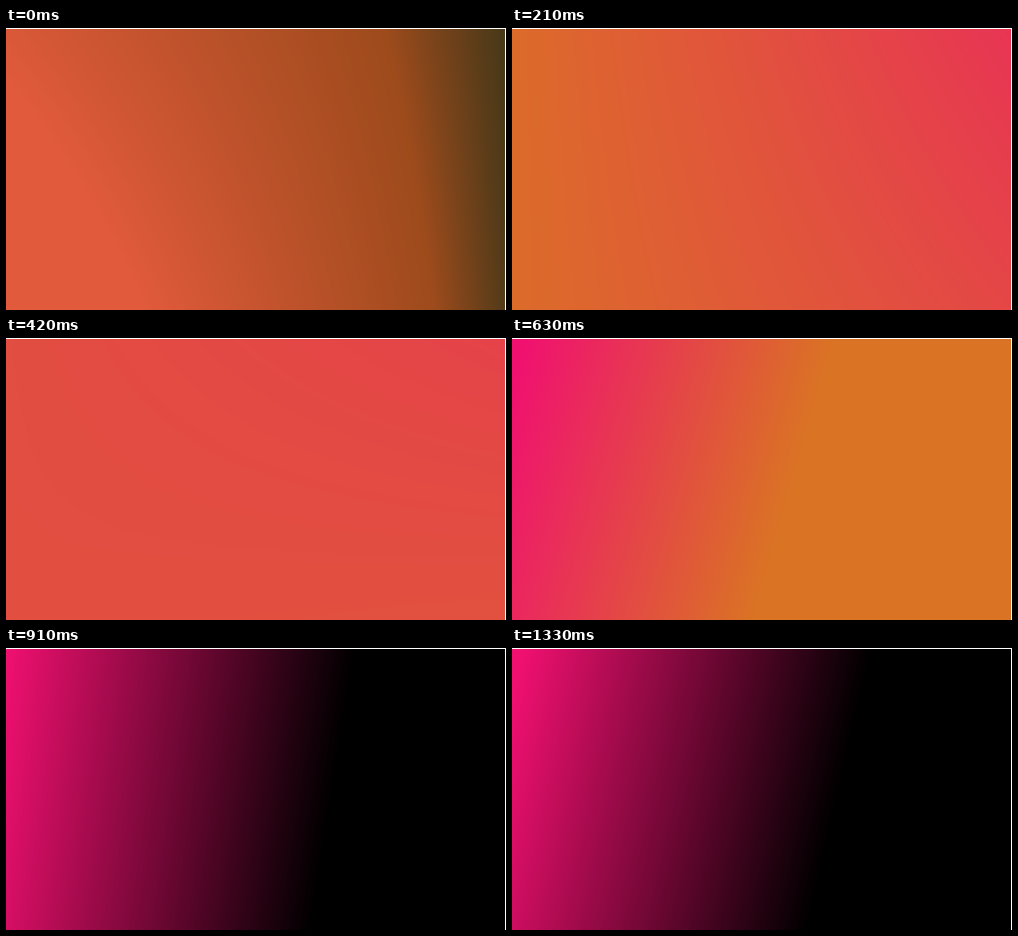
An HTML page with a canvas that plays this animation: 500 by 282 pixels, repeating every 1400 ms.

```html
<!DOCTYPE html>
<html>
<head>
<meta charset="utf-8">
<style>
  html, body { margin: 0; width: 100%; height: 100%; overflow: hidden; background: #fff; }
  canvas { position: absolute; left: 0; top: 1px; }
</style>
</head>
<body>
<canvas id="stage" width="499" height="281"></canvas>
<script>
const W = 499, H = 281, LOOP = 1400, STEP = 70, MID = 0.78;
const ctx = document.getElementById('stage').getContext('2d');
const image = ctx.createImageData(W, H);
image.data.fill(255);

const orange = [218, 115, 36], pink = [240, 16, 112], black = [0, 0, 0];
const lerp = (a, b, k) => a + (b - a) * k;
const mix = (a, b, k) => a.map((v, i) => lerp(v, b[i], k));

// A ramp of low, middle and high colours, placed by its value at each corner.
const key = (time, corners, low, high, middle = mix(low, high, MID)) =>
  ({ time, corners, low, middle, high });

// Corners: top left, top right, bottom left, bottom right.
const keys = [
  key(0, [0.1, 1, -0.35, 0.97], [226, 90, 60], [70, 56, 24], [158, 75, 28]),
  key(210, [0.08, 0.63, 0.08, 0.45], orange, pink),
  key(350, [0.16, 0.84, 0.24, 0.74], orange, pink),
  key(630, [1.03, -0.57, 0.77, -0.83], orange, pink),
  key(910, [1, -0.43, 0.89, -0.57], black, pink),
  key(1120, [1.08, -0.35, 0.81, -0.62], black, pink),
  key(1330, [1.03, -0.4, 0.85, -0.59], black, pink)
];

function stateAt(time) {
  const next = Math.max(1, keys.findIndex(k => k.time >= time));
  const a = keys[next - 1], b = keys[next];
  const k = (time - a.time) / (b.time - a.time);
  const blend = name => mix(a[name], b[name], k);
  return {
    corners: blend('corners'), low: blend('low'),
    middle: blend('middle'), high: blend('high')
  };
}

function draw(time) {
  const { corners: [tl, tr, bl, br], low, middle, high } = stateAt(time);
  const ramp = Array.from({ length: 1001 }, (_, i) => {
    const s = i / 1000;
    return s < MID ? mix(low, middle, s / MID) : mix(middle, high, (s - MID) / (1 - MID));
  });
  let p = 0;
  for (let y = 0; y < H; y++) {
    const left = lerp(tl, bl, y / H), right = lerp(tr, br, y / H);
    for (let x = 0; x < W; x++, p += 4) {
      const s = Math.min(1, Math.max(0, lerp(left, right, x / W)));
      const color = ramp[Math.round(s * 1000)];
      image.data[p] = color[0];
      image.data[p + 1] = color[1];
      image.data[p + 2] = color[2];
    }
  }
  ctx.putImageData(image, 0, 0);
}

let shown = -1;
function tick() {
  const time = Math.floor(performance.now() % LOOP / STEP) * STEP;
  if (time !== shown) draw(shown = time);
  requestAnimationFrame(tick);
}
tick();
</script>
</body>
</html>
```
